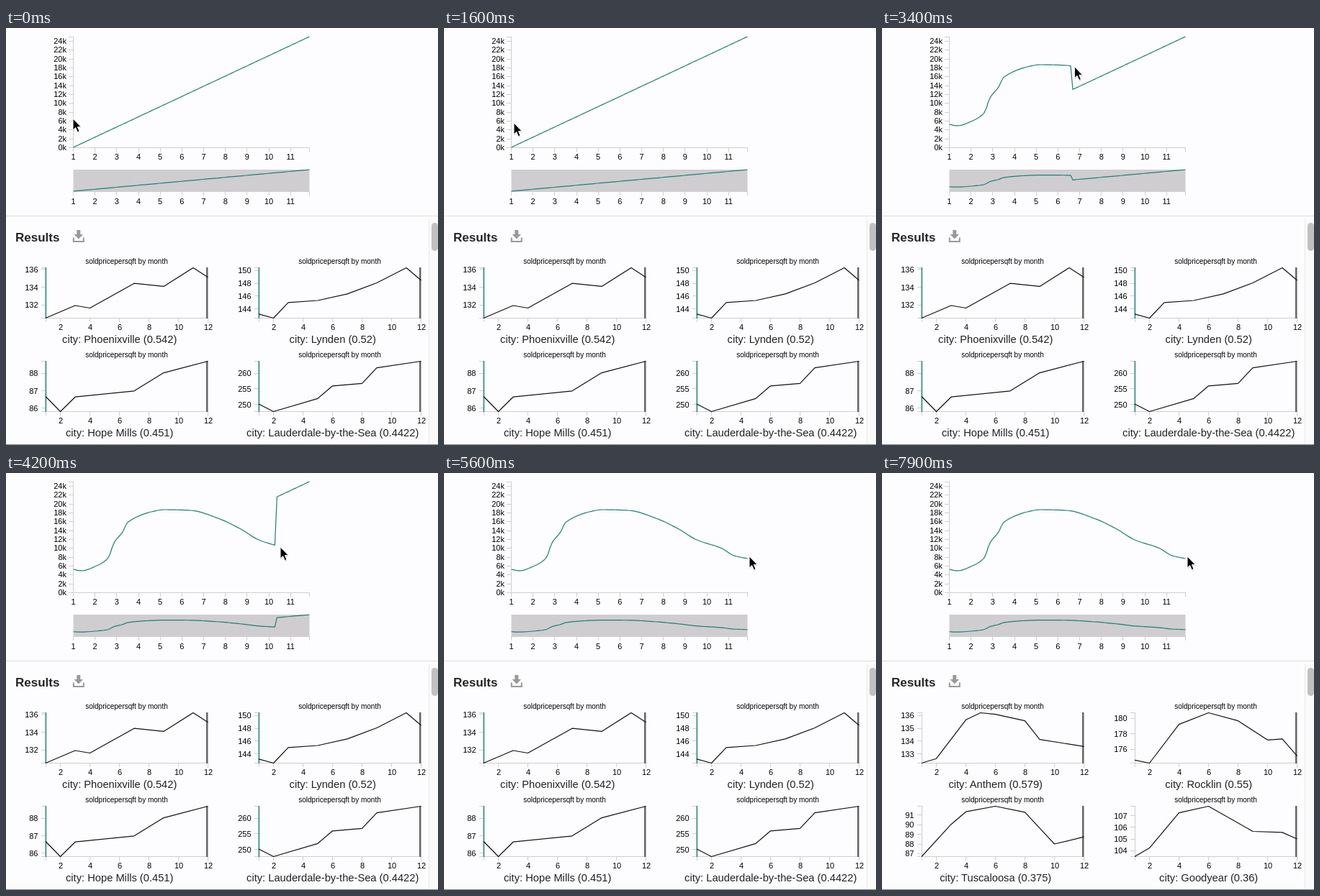
Write an HTML page that moves like this. It is 600 px wide and 580 px high and loops after 8000 ms.

```html
<!DOCTYPE html>
<html lang="en">
<head>
<meta charset="utf-8">
<title>Sketch a trend</title>
<style>
  html, body { margin: 0; width: 100%; height: 100%; overflow: hidden; background: #fdfcfe; }
  svg { display: block; width: 600px; height: 580px; }
  text { font-family: "Liberation Sans", Arial, sans-serif; font-size: 11px; fill: #000; }
  .title { font-size: 10px; }
  .city { font-size: 14.7px; fill: #222; }
  .head { font-size: 17px; font-weight: bold; fill: #262626; }
  .axis { fill: none; stroke: #cfcfcf; shape-rendering: crispEdges; }
  .trend { fill: none; stroke: #1d8078; stroke-width: 1.2; stroke-linejoin: round; }
  .data { fill: none; stroke: #111; stroke-width: 1.2; stroke-linejoin: round; }
</style>
</head>
<body>
<svg id="stage" viewBox="0 0 600 580" xmlns="http://www.w3.org/2000/svg"></svg>
<script>
const LOOP = 8000, STEP = 100;
const DRAW = 1900, RAMP = 600, SPEED = 0.142, LAG = 58, LEAVE = 4900, SWAP = 5800;
const LEFT = 93.5, WIDTH = 328, BASE = 166, HEIGHT = 154, LAST = 109;
const stage = document.getElementById('stage');

function add(parent, tag, attrs, text) {
  const el = document.createElementNS('http://www.w3.org/2000/svg', tag);
  for (const key in attrs) el.setAttribute(key, attrs[key]);
  if (text !== undefined) el.textContent = text;
  parent.appendChild(el);
  return el;
}
const label = (parent, x, y, text, anchor = 'middle', cls = '') =>
  add(parent, 'text', { x, y, 'text-anchor': anchor, class: cls }, text);
const axis = (parent, d) => add(parent, 'path', { d, class: 'axis' });
const toPath = points => 'M' + points.map(p => p[0].toFixed(2) + ',' + p[1].toFixed(2)).join('L');
const clamp = u => Math.max(0, Math.min(1, u));

// Smooth curve through key points that never overshoots them
function smoothCurve(keys) {
  const slope = i => (keys[i + 1][1] - keys[i][1]) / (keys[i + 1][0] - keys[i][0]);
  const tangent = i => {
    if (i === 0) return slope(0);
    if (i === keys.length - 1) return slope(i - 1);
    const a = slope(i - 1), b = slope(i);
    return a * b > 0 ? 2 * a * b / (a + b) : 0;
  };
  return x => {
    let i = 0;
    while (i < keys.length - 2 && x > keys[i + 1][0]) i++;
    const [x0, y0] = keys[i], [x1, y1] = keys[i + 1], w = x1 - x0;
    const u = clamp((x - x0) / w), v = 1 - u;
    return y0 * v * v * (1 + 2 * u) + y1 * u * u * (3 - 2 * u) +
      w * u * v * (tangent(i) * v - tangent(i + 1) * u);
  };
}
const sketch = smoothCurve([
  [93.5, 134], [104, 136], [127, 128.5], [142, 118], [150, 97], [162, 82], [169, 68.5], [204, 53.5],
  [220, 51], [256, 52], [297, 64], [326, 78], [351, 93], [385, 104.5], [403, 115], [421.5, 119]
]);

// The pen speeds up evenly, then keeps its speed to the right edge
function penX(t) {
  const ramp = RAMP * clamp((t - DRAW) / RAMP);
  const steady = Math.max(0, t - DRAW - RAMP);
  return Math.min(421, 97 + SPEED * (ramp * ramp / (2 * RAMP) + steady));
}

function pointerAt(t) {
  if (t <= DRAW) {
    const u = clamp(t / 1200);
    return [93 + 4 * u, 126 + 6 * u];
  }
  const x = penX(t), away = 3 * clamp((t - LEAVE) / 600);
  return [x + away, sketch(x) - away];
}

// Main chart and overview
function monthAxis(y, labelY) {
  let d = `M${LEFT},${y + 6}V${y + .5}H421.5V${y + 6}`;
  for (let m = 1; m <= 11; m++) {
    const x = LEFT + (m - 1) * 30.17;
    d += `M${Math.floor(x) + .5},${y}v6`;
    label(stage, x, labelY, m);
  }
  axis(stage, d);
}
let valueAxis = `M87,12.5H93.5V${BASE + .5}H87`;
for (let k = 0; k <= 24; k += 2) {
  const y = BASE - k * HEIGHT / 25;
  valueAxis += `M87,${Math.round(y) + .5}h6`;
  label(stage, 84, y + 4, k + 'k', 'end');
}
axis(stage, valueAxis);
monthAxis(BASE, 183);
add(stage, 'rect', { x: LEFT, y: 197, width: WIDTH, height: 30, fill: '#cfcdcf' });
monthAxis(227, 244.5);
const trend = add(stage, 'path', { class: 'trend' });
const overview = add(stage, 'path', { class: 'trend' });

// Results panel
axis(stage, 'M0,261.5H600').style.stroke = '#dedede';
add(stage, 'rect', { x: 587, y: 266, width: 13, height: 313, fill: '#fafafa' });
axis(stage, 'M587.5,266V579').style.stroke = '#e8e8e8';
add(stage, 'rect', { x: 591, y: 271, width: 9, height: 39, rx: 4.5, fill: '#c1c0c1' });
label(stage, 13, 297, 'Results', 'start', 'head');
add(stage, 'path', { d: 'M98.3,281h5v6h3.7l-6.2,6.5l-6.2,-6.5h3.7z', fill: '#999' });
add(stage, 'path', { d: 'M93.8,291.5v5.5h14v-5.5', fill: 'none', stroke: '#999', 'stroke-width': 2 });

// range: [lowest, highest, tick step]; turns: [month, percent of height] where the line bends
const before = [
  { city: 'Phoenixville (0.542)', range: [130.5, 136.2, 2],
    turns: [[1, 0], [3, 25], [4, 20], [7, 69], [9, 63], [11, 100], [12, 81]] },
  { city: 'Lynden (0.52)', range: [142.6, 150.4, 2],
    turns: [[1, 8], [2, 0], [3, 31], [5, 35], [7, 48], [9, 70], [11, 100], [12, 75]] },
  { city: 'Hope Mills (0.451)', range: [85.8, 88.7, 1],
    turns: [[1, 30], [2, 0], [3, 29], [7, 41], [9, 77], [12, 100]] },
  { city: 'Lauderdale-by-the-Sea (0.4422)', range: [247.7, 263.9, 5],
    turns: [[1, 15], [2, 0], [5, 26], [6, 51], [8, 56], [9, 87], [12, 100]] }
];
const after = [
  { city: 'Anthem (0.579)', range: [132.3, 136.2, 1],
    turns: [[1, 0], [2, 9], [4, 86], [5, 100], [6, 97], [8, 84], [9, 47], [12, 33]] },
  { city: 'Rocklin (0.55)', range: [174.2, 180.7, 2],
    turns: [[1, 6], [2, 0], [4, 77], [6, 100], [8, 84], [10, 46], [11, 48], [12, 14]] },
  { city: 'Tuscaloosa (0.375)', range: [86.7, 91.9, 1],
    turns: [[1, 0], [3, 64], [4, 89], [6, 100], [8, 88], [10, 25], [12, 39]] },
  { city: 'Goodyear (0.36)', range: [103.5, 107.8, 1],
    turns: [[1, 0], [2, 17], [4, 87], [6, 100], [9, 50], [11, 48], [12, 35]] }
];

function resultChart(parent, { city, range, turns }, i, marked) {
  const x = 55 + (i % 2) * 296, top = i < 2 ? 333 : 463, bottom = top + 70;
  const monthX = m => x + (m - 1) * 20.5;
  const percentY = p => bottom + .5 - .7 * p;
  const [low, high, step] = range;
  let d = `M${x - 6},${top + .5}H${x}V${bottom + .5}H${x - 6}M${x},${bottom + 6}V${bottom + .5}H${monthX(12)}v6`;
  for (let v = Math.ceil(low / step) * step; v <= high; v += step) {
    const y = percentY(100 * (v - low) / (high - low));
    d += `M${x - 6},${Math.floor(y) + .5}h6`;
    label(parent, x - 10.5, y + 4, v, 'end');
  }
  for (let m = 2; m <= 12; m += 2) {
    d += `M${Math.floor(monthX(m)) + .5},${bottom}v6`;
    label(parent, monthX(m) + .5, bottom + 17, m);
  }
  axis(parent, d);
  if (marked) add(parent, 'rect', { x: x - .5, y: top, width: 1.7, height: 71, fill: '#2f9184' });
  add(parent, 'rect', { x: x + 223, y: top, width: 2.5, height: 71, fill: '#666' });
  add(parent, 'path', { d: toPath(turns.map(([m, p]) => [monthX(m), percentY(p)])), class: 'data' });
  label(parent, x + 112.5, top - 5.5, 'soldpricepersqft by month', 'middle', 'title');
  label(parent, x + 102.7, top + 105, 'city: ' + city, 'middle', 'city');
}
const groups = [before, after].map((set, n) => {
  const g = add(stage, 'g', {});
  set.forEach((chart, i) => resultChart(g, chart, i, n === 0));
  return g;
});
add(stage, 'rect', { x: 0, y: 579, width: 600, height: 1, fill: '#7d857d' });

const arrow = 'M0,0V16L3.6,12.6L6.3,18.8L9,17.6L6.4,11.6H11.2Z';
const cursor = add(stage, 'g', {});
add(cursor, 'path', { d: arrow, transform: 'translate(.5 1.5)', fill: '#000', opacity: .18 });
add(cursor, 'path', { d: arrow, fill: '#000', stroke: '#fff', 'stroke-width': 1 });

function render(time) {
  const t = Math.floor((time % LOOP) / STEP) * STEP;
  const reached = t > DRAW ? Math.ceil((penX(t - LAG) - LEFT) * LAST / WIDTH) : -1;
  const points = [];
  for (let i = 0; i <= LAST; i++) {
    const x = LEFT + WIDTH * i / LAST;
    points.push([x, i <= reached ? sketch(x) : BASE - HEIGHT * i / LAST]);
  }
  trend.setAttribute('d', toPath(points));
  overview.setAttribute('d', toPath(points.map(([x, y]) => [x, 227 - (BASE - y) * 30 / HEIGHT])));
  cursor.setAttribute('transform', `translate(${pointerAt(t).join(' ')})`);
  groups[0].style.display = t < SWAP ? '' : 'none';
  groups[1].style.display = t < SWAP ? 'none' : '';
}

const start = performance.now();
function tick() {
  render(performance.now() - start);
  requestAnimationFrame(tick);
}
tick();
</script>
</body>
</html>
```
